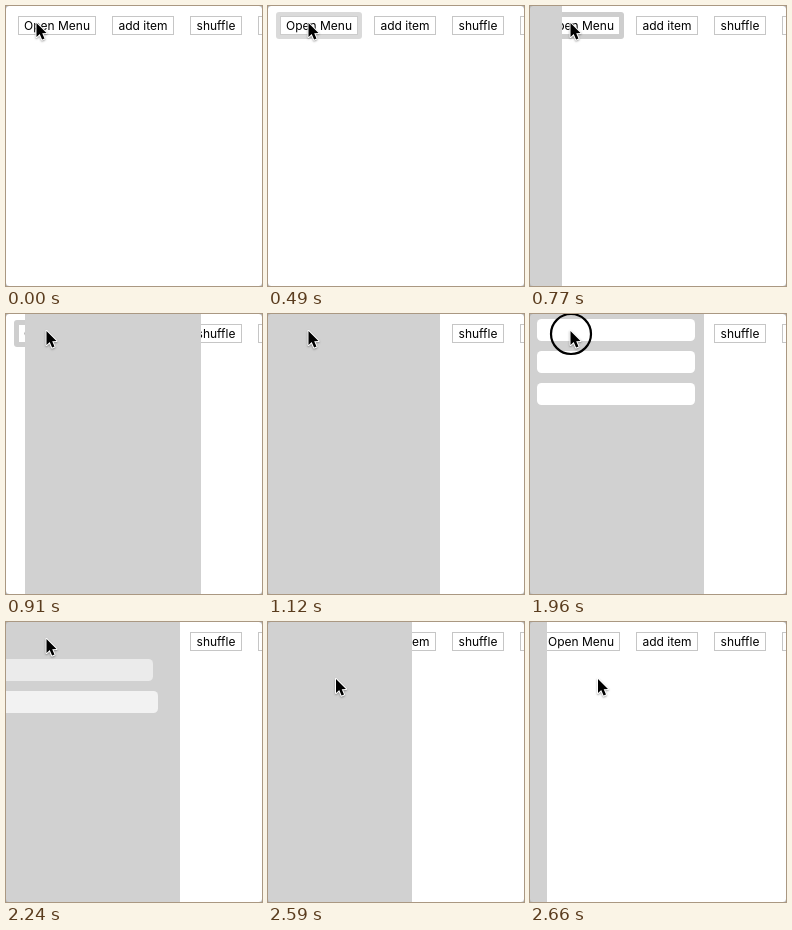
Write an HTML page with a canvas that moves like this. It is 256 px wide and 280 px high and loops after 2730 ms.

```html
<!DOCTYPE html>
<html lang="en">
<head>
<meta charset="utf-8">
<title>Spring menu</title>
<style>
  html, body { margin: 0; width: 100%; height: 100%; overflow: hidden; background: #fff; }
  canvas { display: block; }
</style>
</head>
<body>
<canvas id="stage" width="256" height="280"></canvas>
<script>
const ctx = document.getElementById('stage').getContext('2d');
const W = 256, H = 280, LOOP = 2730, TICK = 70;
const GREY = '#d1d1d1';
const MENU = { width: 176, rest: -2, open: 738, close: 2560 };
const ITEM = { x: 7, y: 5, w: 158, h: 22, pitch: 32, shift: 17, open: 1096, close: 2053, stagger: 50, fade: 300 };
const BUTTONS = [[12, 78, 'Open Menu'], [106, 62, 'add item'], [184, 52, 'shuffle'], [252, 40, '']];
const CLICKS = [350, 1960];
const CLICK_TIME = 140;

const clamp = v => Math.max(0, Math.min(1, v));
const smooth = v => { v = clamp(v); return v * v * (3 - 2 * v); };

// Underdamped spring (stiffness 500, damping 25) from 0 to 1; ms is time since release.
function spring(ms) {
  if (ms <= 0) return 0;
  const t = ms / 1000, decay = 12.5, freq = Math.sqrt(500 - decay * decay);
  return 1 - Math.exp(-decay * t) * (Math.cos(freq * t) + decay / freq * Math.sin(freq * t));
}

const openness = (t, open, close) => t < close ? spring(t - open) : 1 - spring(t - close);

function roundRect(x, y, w, h, r, color) {
  ctx.fillStyle = color;
  ctx.beginPath();
  ctx.roundRect(x, y, w, h, r);
  ctx.fill();
}

function drawButtons(t) {
  ctx.font = '12px Inter, sans-serif';
  ctx.textAlign = 'center';
  ctx.textBaseline = 'alphabetic';
  BUTTONS.forEach(([x, w, label], i) => {
    const focus = i === 0 && t < 2000 ? clamp((t - 280) / 280) : 0;
    ctx.strokeStyle = '#c6c6c6';
    ctx.lineWidth = 1;
    ctx.strokeRect(x + 0.5, 10.5, w - 1, 18);
    if (focus) {
      ctx.globalAlpha = focus;
      roundRect(x - 4, 6, w + 8, 27, 3, '#cecece');
      ctx.globalAlpha = 1;
      ctx.fillStyle = '#fff';
      ctx.fillRect(x + 1, 11, w - 2, 17);
    }
    ctx.fillStyle = '#000';
    ctx.fillText(label, x + w / 2, 24);
  });
}

function drawMenu(t) {
  const x = MENU.rest + MENU.width * (openness(t, MENU.open, MENU.close) - 1);
  ctx.fillStyle = GREY;
  ctx.fillRect(Math.round(x), 0, MENU.width, H);
}

// Opacity shows as a few flat greys.
function itemColor(alpha) {
  if (alpha < 0.5) return null;
  if (alpha < 0.65) return '#ebebeb';
  return alpha < 0.87 ? '#f2f2f2' : '#fff';
}

function drawItems(t) {
  for (let i = 0; i < 3; i++) {
    const open = ITEM.open + i * ITEM.stagger, close = ITEM.close + i * ITEM.stagger;
    const alpha = t < close ? clamp((t - open) / ITEM.fade) : 1 - clamp((t - close) / ITEM.fade);
    const color = itemColor(alpha);
    if (!color) continue;
    const x = ITEM.x + ITEM.shift * (openness(t, open, close) - 1);
    roundRect(Math.round(x), ITEM.y + i * ITEM.pitch, ITEM.w, ITEM.h, 4.5, color);
  }
}

function drawCorners() {
  ctx.fillStyle = '#b8b8b8';
  ctx.beginPath();
  ctx.rect(0, 0, W, H);
  ctx.roundRect(0, 0, W, H, 3.5);
  ctx.fill('evenodd');
}

function drawClick(t) {
  if (!CLICKS.some(start => t >= start && t < start + CLICK_TIME)) return;
  ctx.strokeStyle = '#000';
  ctx.lineWidth = 2.2;
  ctx.beginPath();
  ctx.arc(41, 20, 20, 0, Math.PI * 2);
  ctx.stroke();
}

function drawCursor(t) {
  const leave = smooth((t - 2240) / 140);
  const x = 30.5 + 10 * smooth(t / 210) + 27.5 * leave;
  const y = 17 + 40 * leave;
  ctx.save();
  ctx.translate(x, y);
  ctx.beginPath();
  [[0, 0], [0, 14], [3.2, 11], [5.6, 16.6], [8, 15.6], [5.7, 10.2], [10, 10]]
    .forEach(([px, py]) => ctx.lineTo(px, py));
  ctx.closePath();
  ctx.lineJoin = 'round';
  ctx.strokeStyle = '#fff';
  ctx.lineWidth = 2;
  ctx.shadowColor = 'rgba(0, 0, 0, 0.35)';
  ctx.shadowBlur = 2;
  ctx.shadowOffsetY = 1;
  ctx.stroke();
  ctx.shadowColor = 'transparent';
  ctx.fillStyle = '#000';
  ctx.fill();
  ctx.restore();
}

function draw(t) {
  ctx.fillStyle = '#fff';
  ctx.fillRect(0, 0, W, H);
  drawButtons(t);
  drawMenu(t);
  drawItems(t);
  drawCorners();
  drawClick(t);
  drawCursor(t);
}

const begin = performance.now();
function frame() {
  const t = (performance.now() - begin) % LOOP;
  draw(Math.floor(t / TICK) * TICK);
  requestAnimationFrame(frame);
}
frame();
</script>
</body>
</html>
```
